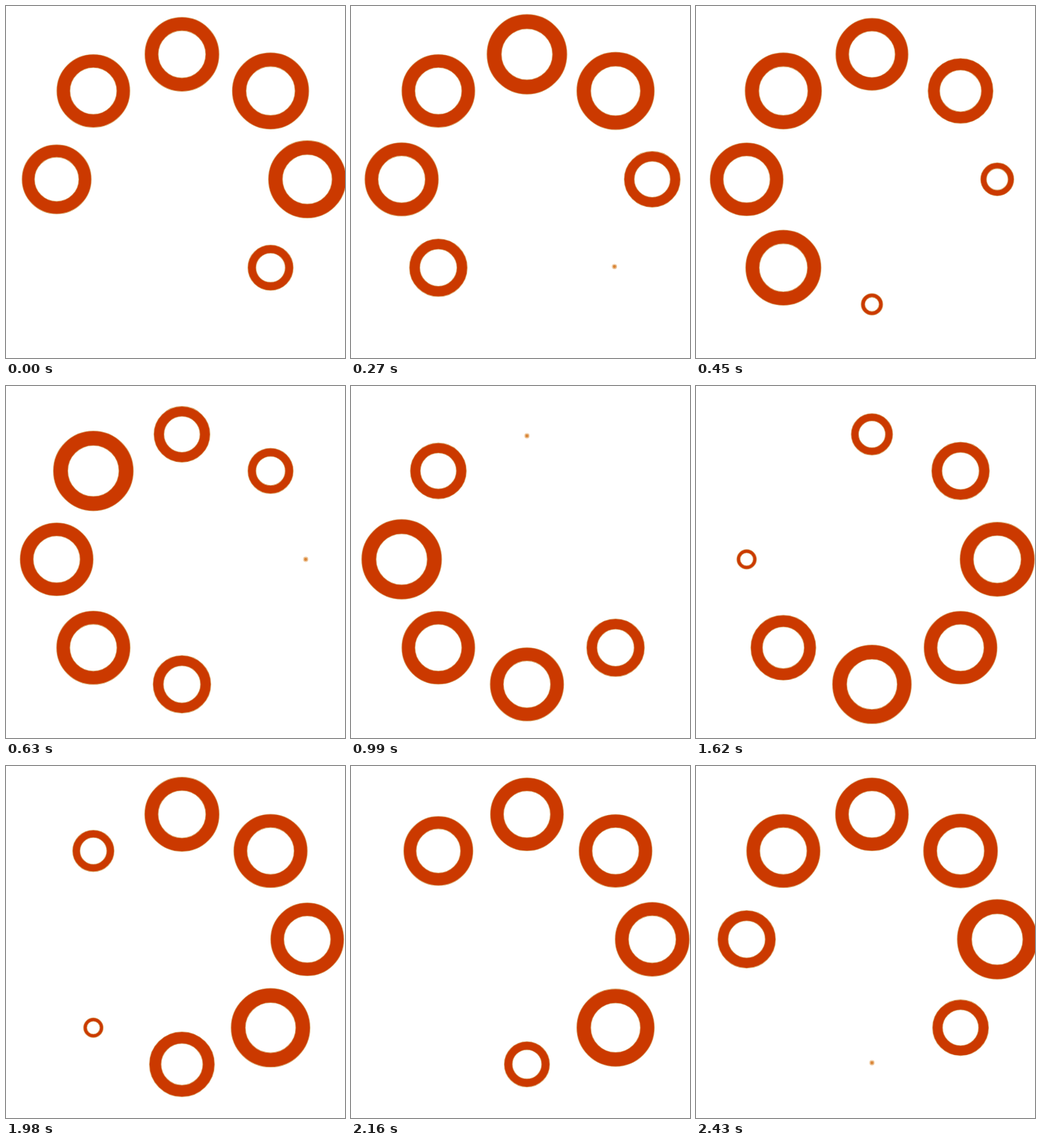
These frames come from a looping animation (441x459 px, 2520 ms). An HTML page with a canvas:

```html
<!DOCTYPE html>
<html lang="en">
<head>
<meta charset="utf-8">
<title>Ring spinner</title>
<style>
html, body { margin: 0; width: 100%; height: 100%; overflow: hidden; background: #fff; }
canvas { display: block; }
</style>
</head>
<body>
<canvas id="stage" width="441" height="459"></canvas>
<script>
const ctx = document.getElementById('stage').getContext('2d');
const STEP = 90, STEPS = 28, LOOP = STEP * STEPS;
const CX = 228.9, CY = 226, ORBIT = 163, RINGS = 8;
const PEAK = 104, REST = 95, OVERSHOOT = 98;

const mix = (a, b, u) => a + (b - a) * u;
const easeOut = u => Math.sin(u * Math.PI / 2);
const smooth = u => u * u * (3 - 2 * u);
const progress = (t, from, to) => Math.min(1, Math.max(0, (t - from) / (to - from)));

// Outer diameter, by steps since the ring's peak: shrink, wait, pop in, settle, swell
function sizeAt(t) {
  if (t < 13) return PEAK * (1 - progress(t, 0, 8.3) ** 1.65);
  if (t < 18) return OVERSHOOT * easeOut(progress(t, 13, 18.4));
  if (t < 24) return mix(OVERSHOOT, REST, progress(t, 18, 20.5));
  return mix(REST, PEAK, smooth(progress(t, 24, 28)));
}

// Rings peak four steps apart; the last one is held to the end of the loop
const peakOf = i => 3 + Math.min(i * 4, STEPS - 1);

function circle(x, y, r) {
  ctx.beginPath();
  ctx.arc(x, y, r, 0, Math.PI * 2);
}

function ring(x, y, d) {
  const outer = d / 2 + 0.5, inner = d * 0.315;
  circle(x, y, (outer + inner) / 2);
  const band = (width, color) => {
    ctx.lineWidth = width;
    ctx.strokeStyle = color;
    ctx.stroke();
  };
  band(outer - inner, '#d9a468');
  band(outer - inner - 1.6, '#cb3900');
}

function dot(x, y) {
  circle(x, y, 3.4);
  ctx.fillStyle = '#eec89e';
  ctx.fill();
  circle(x, y, 2);
  ctx.fillStyle = '#d98436';
  ctx.fill();
}

function draw(time) {
  const step = Math.floor((time + 0.5) / STEP);
  ctx.clearRect(0, 0, 441, 459);
  for (let i = 0; i < RINGS; i++) {
    const d = sizeAt((step - peakOf(i) + 2 * STEPS) % STEPS);
    if (d <= 0) continue;
    const angle = -Math.PI / 2 - i * 2 * Math.PI / RINGS;
    const tiny = d < 10;
    const r = tiny ? ORBIT - 2 : ORBIT;
    const x = CX + r * Math.cos(angle), y = CY + r * Math.sin(angle);
    tiny ? dot(x, y) : ring(x, y, d);
  }
}

const start = performance.now();
function tick() {
  draw((performance.now() - start) % LOOP);
  requestAnimationFrame(tick);
}
tick();
</script>
</body>
</html>
```
